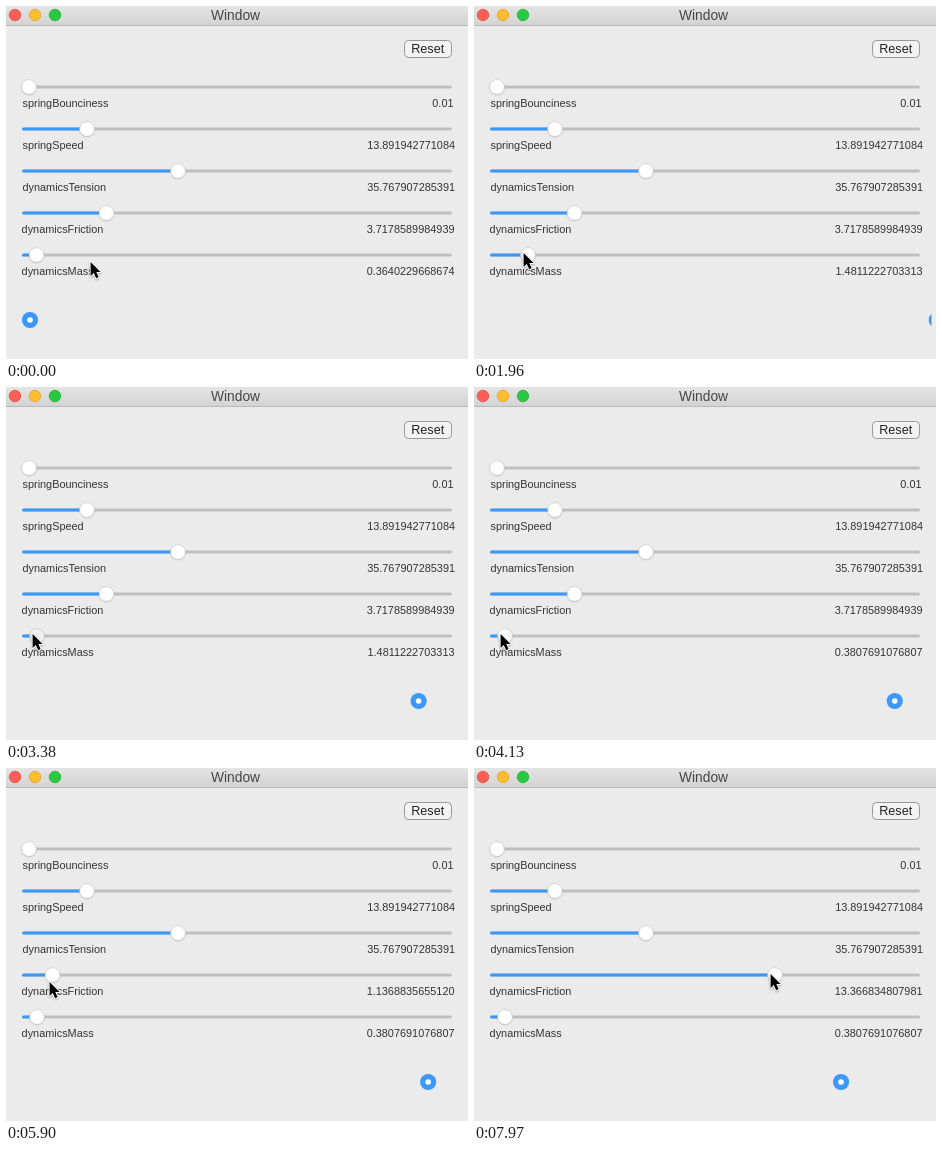
An HTML page with a canvas for the animation above (8000 ms loop, 462 by 353 pixels).

```html
<!DOCTYPE html>
<html lang="en">
<head>
<meta charset="utf-8">
<title>Spring sliders</title>
<style>
  html, body { margin: 0; width: 100%; height: 100%; overflow: hidden; background: #ebebeb; }
  canvas { display: block; }
</style>
</head>
<body>
<canvas id="stage" width="462" height="353"></canvas>
<script>
const ctx = document.getElementById('stage').getContext('2d');
const LOOP = 8000;
const BLUE = '#3b99fc';
const FONT = '"Liberation Sans", Arial, sans-serif';
const TENSION = 35.768;
const BALL_FROM = 24, BALL_TO = 413.5, BALL_Y = 314, BALL_CLIP = 457.5;

// Each release of a slider restarts the ball with new spring settings.
const releases = [
  { at: 1003, mass: 1.481, friction: 3.718 },
  { at: 3540, mass: 0.381, friction: 3.718 },
  { at: 5399, mass: 0.381, friction: 1.067 },
  { at: 7210, mass: 0.381, friction: 13.367 }
];

// Keyframes: [time, value, ...]
const cursorKeys = [
  [60, 84, 256], [330, 21, 245], [450, 25.5, 247], [630, 25.5, 247], [850, 49, 247],
  [2790, 49, 247], [3350, 26, 247], [4340, 26, 247], [4850, 96, 213], [4930, 96, 213],
  [5390, 43, 214], [6080, 43, 214], [6260, 47.5, 210], [6300, 47.5, 210],
  [7000, 302.5, 210], [7240, 302.5, 210], [7560, 296, 206]
];
const massKeys = [[630, 30.5], [850, 54], [2790, 54], [3350, 31]];
const frictionKeys = [[4930, 100.5], [5390, 46.5], [6300, 46.5], [7000, 301]];
const massPresses = [[610, 1003], [2500, 3540]];
const frictionPresses = [[4890, 5399], [6270, 7210]];

const still = x => [[0, x]];
const sliders = [
  { label: 'springBounciness', left: 16.5, right: 447.5, keys: still(23), values: [[0, '0.01']] },
  { label: 'springSpeed', left: 16.5, right: 449, keys: still(81), values: [[0, '13.891942771084']] },
  { label: 'dynamicsTension', left: 16.5, right: 449, keys: still(172), values: [[0, '35.767907285391']] },
  { label: 'dynamicsFriction', left: 15.6, right: 448.5, keys: frictionKeys, presses: frictionPresses,
    values: [[0, '3.7178589984939'], [5399, '1.1368835655120'], [7210, '13.366834807981']] },
  { label: 'dynamicsMass', left: 15.6, right: 448.5, keys: massKeys, presses: massPresses,
    values: [[0, '0.3640229668674'], [1003, '1.4811222703313'], [3540, '0.3807691076807']] }
];

function tween(keys, t) {
  const next = keys.findIndex(k => k[0] > t);
  if (next === 0) return keys[0].slice(1);
  if (next < 0) return keys[keys.length - 1].slice(1);
  const a = keys[next - 1], b = keys[next];
  const u = (t - a[0]) / (b[0] - a[0]);
  const s = u * u * (3 - 2 * u);
  return a.slice(1).map((v, i) => v + (b[i + 1] - v) * s);
}

// Remaining fraction of the distance for a damped spring released at rest.
function springRest(sec, mass, friction) {
  const decay = friction / (2 * mass);
  const d = TENSION / mass - decay * decay;
  const w = Math.sqrt(Math.abs(d));
  if (d > 0) return Math.exp(-decay * sec) * (Math.cos(w * sec) + decay / w * Math.sin(w * sec));
  const slow = decay - w, fast = decay + w;
  return (fast * Math.exp(-slow * sec) - slow * Math.exp(-fast * sec)) / (fast - slow);
}

function ballX(t) {
  const run = releases.filter(r => r.at <= t).pop();
  if (!run) return BALL_FROM;
  const rest = springRest((t - run.at) / 1000, run.mass, run.friction);
  return BALL_TO + (BALL_FROM - BALL_TO) * rest;
}

function disc(x, y, r, fill, stroke) {
  ctx.beginPath();
  ctx.arc(x, y, r, 0, Math.PI * 2);
  ctx.fillStyle = fill;
  ctx.fill();
  if (stroke) {
    ctx.lineWidth = 0.7;
    ctx.strokeStyle = stroke;
    ctx.stroke();
  }
}

function pill(x, y, w, h, r, fill) {
  ctx.beginPath();
  ctx.roundRect(x, y, w, h, r);
  ctx.fillStyle = fill;
  ctx.fill();
}

function write(text, x, y, size, align, color) {
  ctx.font = size + 'px ' + FONT;
  ctx.textAlign = align;
  ctx.fillStyle = color;
  ctx.fillText(text, x, y);
}

function drawWindow() {
  ctx.fillStyle = '#ebebeb';
  ctx.fillRect(0, 0, 462, 353);
  const bar = ctx.createLinearGradient(0, 0, 0, 19);
  bar.addColorStop(0, '#e4e4e4');
  bar.addColorStop(1, '#d3d3d3');
  ctx.fillStyle = bar;
  ctx.fillRect(0, 0, 462, 19);
  ctx.fillStyle = '#b9b9b9';
  ctx.fillRect(0, 19, 462, 1);
  disc(9, 9, 5.8, '#fd5f57', '#e2463f');
  disc(29, 9, 5.8, '#fdbd2e', '#e0a028');
  disc(49, 9, 5.8, '#28c940', '#1fad30');
  write('Window', 229.5, 14, 13.8, 'center', '#454545');

  pill(398.5, 34.5, 47, 17, 4, '#f3f3f3');
  ctx.lineWidth = 1;
  ctx.strokeStyle = '#989898';
  ctx.stroke();
  write('Reset', 421.7, 47, 12.6, 'center', '#222');
}

function drawSlider(slider, y, t) {
  const [x] = tween(slider.keys, t);
  const pressed = (slider.presses || []).some(([from, to]) => t >= from && t < to);
  pill(16, y - 1.5, 430, 3, 1.5, '#bfbfbf');
  pill(16, y - 1.5, x - 16, 3, 1.5, BLUE);
  ctx.save();
  ctx.shadowColor = 'rgba(0,0,0,0.28)';
  ctx.shadowBlur = 1.5;
  ctx.shadowOffsetY = 0.6;
  disc(x, y, 7.3, pressed ? '#f0f0f0' : '#fff');
  ctx.restore();
  disc(x, y, 7.3, pressed ? '#f0f0f0' : '#fff', '#cfcfcf');
  const value = slider.values.filter(v => v[0] <= t).pop()[1];
  write(slider.label, slider.left, y + 20, 10.9, 'left', '#333');
  write(value, slider.right, y + 20, 10.9, 'right', '#333');
}

function drawBall(t) {
  const x = ballX(t);
  ctx.save();
  ctx.beginPath();
  ctx.rect(0, 300, BALL_CLIP, 30);
  ctx.clip();
  disc(x, BALL_Y, 8.1, BLUE);
  disc(x, BALL_Y, 2.8, '#fff');
  ctx.restore();
}

function drawCursor(t) {
  const [x, y] = tween(cursorKeys, t);
  const outline = [[0, 0], [0, 14], [3.2, 11], [5.6, 16.2], [8, 15.1], [5.7, 10.1], [10, 10]];
  ctx.save();
  ctx.translate(x + 0.6, y);
  ctx.beginPath();
  outline.forEach(([px, py]) => ctx.lineTo(px, py));
  ctx.closePath();
  ctx.shadowColor = 'rgba(0,0,0,0.3)';
  ctx.shadowBlur = 2;
  ctx.shadowOffsetY = 1;
  ctx.lineWidth = 1.8;
  ctx.lineJoin = 'round';
  ctx.strokeStyle = '#fff';
  ctx.stroke();
  ctx.shadowColor = 'transparent';
  ctx.fillStyle = '#000';
  ctx.fill();
  ctx.restore();
}

function draw(t) {
  drawWindow();
  sliders.forEach((slider, i) => drawSlider(slider, 81 + i * 42, t));
  drawBall(t);
  drawCursor(t);
}

const start = performance.now();
function tick() {
  draw((performance.now() - start) % LOOP);
  requestAnimationFrame(tick);
}
tick();
</script>
</body>
</html>
```
